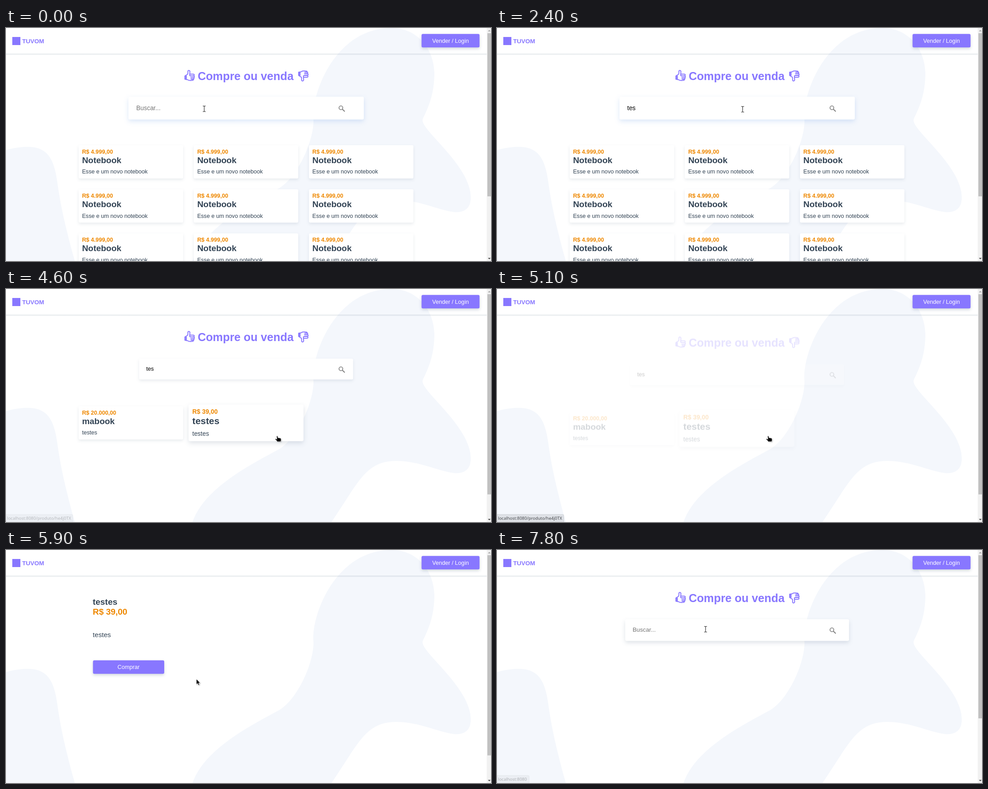
An HTML page that plays this animation: 1079x519 px, repeating every 8 s.

```html
<!DOCTYPE html>
<html lang="pt">
<head>
<meta charset="utf-8">
<title>Compre ou venda</title>
<style>
  html, body { margin: 0; width: 100%; height: 100%; overflow: hidden; background: #fff; }
  svg { display: block; width: 1079px; height: 519px; }
  text { font-family: "Liberation Sans", Arial, sans-serif; font-size: 12.64px; fill: #345; white-space: pre; }
  .bold { font-weight: bold; }
  .title { font-weight: bold; font-size: 18.96px; }
  .price { font-weight: bold; fill: #e80; }
  .white { fill: #fff; text-anchor: middle; }
  .box { fill: #fff; filter: drop-shadow(0 3.2px 3px rgba(30, 60, 90, .1)); }
  .lift { filter: drop-shadow(0 4.7px 4.7px rgba(30, 60, 90, .14)); }
  .glow { filter: drop-shadow(0 4.7px 5px rgba(50, 120, 220, .17)); }
  .btn { fill: #87f; filter: drop-shadow(0 3.2px 3px rgba(30, 60, 90, .2)); }
  .url { font-family: "Noto Sans", "Open Sans", sans-serif; font-size: 9.48px; fill: #45484c; }
</style>
</head>
<body>
<svg viewBox="0 0 1079 519" xmlns="http://www.w3.org/2000/svg">
  <defs>
    <linearGradient id="fade" x2="0" y2="1">
      <stop stop-color="#1e3c5a" stop-opacity=".13"/>
      <stop offset="1" stop-color="#1e3c5a" stop-opacity="0"/>
    </linearGradient>
    <g id="thumb" fill="none" stroke="#87f" stroke-width="2" stroke-linejoin="round" stroke-linecap="round">
      <path d="M2 13 L7.5 9.5 C8.6 7 8 4 8.3 2.2 C9 .4 12.2 .8 12.6 3 C13 5.5 12.3 7.5 12.2 9.3"/>
      <path d="M1.5 13.5 V20.5 L7 21.5 C10 24 15 23.6 19 22.8"/>
      <path d="M13.5 9.3 H20 C23 9.3 23 13.3 20 13.3 H14.5 C11.5 13.3 11.5 9.3 13.5 9.3 Z"/>
      <path d="M14.5 13.4 H20.5 C23.4 13.4 23.2 17.2 20.5 17.2 H14.5 M15 17.4 H20 C22.6 17.4 22.4 20.4 20 20.4 H15 M15.5 20.6 H19 C21 20.6 21 22.8 19 22.8"/>
      <path d="M4.2 13.5 V20.4" stroke-width="3"/>
    </g>
  </defs>

  <g fill="#f4f7fc">
    <path d="M858 0 C915 0 952 46 953 100 C953 150 938 180 927 203 C920 226 1034 305 1034 378 C1034 405 1015 414 990 409 C950 401 915 383 868 383 C800 383 785 430 724 519 H415 C440 445 540 393 609 356 C650 330 685 250 684 205 C678 150 730 0 858 0 Z"/>
    <path d="M0 272 C20 266 40 264 55 265 C90 267 105 290 112 330 C120 380 122 405 153 519 H0 Z"/>
  </g>
  <rect y="57" width="1070" height="4" fill="url(#fade)"/>
  <rect x="14" y="20" width="18" height="18" fill="#87f"/>
  <text class="bold" x="36" y="33.8" style="font-size:13.5px;fill:#87f">TUVOM</text>
  <rect class="btn" x="924.5" y="13.3" width="129" height="30" rx="3"/>
  <text class="white" x="989" y="32.6">Vender / Login</text>

  <g id="home">
    <use href="#thumb" transform="translate(396.5 93.5)"/>
    <text class="bold" x="426.4" y="115.8" style="font-size:25.28px;fill:#87f">Compre ou venda</text>
    <use href="#thumb" transform="translate(649.5 119) scale(1 -1)"/>
    <g id="field">
      <rect id="input" class="box" x="296.2" y="155.2" width="476" height="46.2" rx="3"/>
      <text id="query" x="312" y="182.3"></text>
      <path id="caret" d="M0 171.2 V185" stroke="#000" stroke-width=".9"/>
    </g>
    <g fill="none" stroke="#808080">
      <circle cx="745.1" cy="177.7" r="4.2" stroke-width="1.7"/>
      <path d="M748.2 180.8 L753.6 186" stroke-width="2.1"/>
    </g>
    <g id="all"></g>
    <g id="found"></g>
  </g>

  <g id="product">
    <text class="title" x="193" y="122.3">testes</text>
    <text class="title price" x="193" y="144.3">R$ 39,00</text>
    <text x="193" y="194.2" style="font-size:15.17px">testes</text>
    <rect class="btn" x="193.5" y="245.8" width="158.5" height="30" rx="3"/>
    <text class="white" x="272.6" y="264.7">Comprar</text>
  </g>

  <rect x="1069.5" width="9.5" height="519" fill="#f1f1f1"/>
  <rect id="bar" x="1071" y="11.5" width="8" fill="#c1c1c1"/>
  <path d="M1072.2 7.5 h6 l-3 -3.2 z" fill="#a3a3a3"/>
  <path d="M1072.2 512 h6 l-3 3.2 z" fill="#505050"/>

  <g id="status">
    <path id="panel" fill="#dee1e6" stroke="#c6c9cd" stroke-width=".8"/>
    <text id="link" class="url" x="2.2" y="514.3"></text>
  </g>

  <g id="text">
    <path d="M-3.2 -6.3 H-1 L0 -5.5 L1 -6.3 H3.2 M0 -5.5 V5.5 M-3.2 6.3 H-1 L0 5.5 L1 6.3 H3.2" fill="none" stroke="#fff" stroke-width="2.4"/>
    <path d="M-3.2 -6.3 H-1 L0 -5.5 L1 -6.3 H3.2 M0 -5.5 V5.5 M-3.2 6.3 H-1 L0 5.5 L1 6.3 H3.2" fill="none" stroke="#222" stroke-width="1.1"/>
  </g>
  <path id="arrow" d="M.5 .5 V12.6 L3.2 10 L5.2 14.2 L7.3 13.2 L5.4 9.2 H9 Z" fill="#000" stroke="#fff" stroke-width=".8" style="filter:drop-shadow(1px 1px 1px rgba(0,0,0,.3))"/>
  <path id="hand" d="M-3.3 -5.8 C-2.5 -6.8 -1.4 -6.2 -1.2 -5.2 L-.4 -2.1 L4 -1.4 C5.6 -1.1 6.4 -.2 6.4 1.4 V4 L5.4 6.5 H-2.3 L-3.3 4.2 L-6.2 1.8 C-7 .7 -5.8 -.3 -4.8 .2 L-2.6 1.3 L-3.4 -4.4 Z" fill="#000" stroke="#fff" stroke-width=".7" style="filter:drop-shadow(1px 1px 1px rgba(0,0,0,.3))"/>
</svg>
<script>
const LOOP = 8000;
const $ = id => document.getElementById(id);

function card(col, row, price, name, note) {
  const x = 161.6 + col * 256.2, y = 261 + row * 98.25;
  return `<g><rect class="box" x="${x}" y="${y}" width="232.4" height="74.2" rx="3"/>
    <text class="price" x="${x + 7.6}" y="${y + 18.8}">${price}</text>
    <text class="title" x="${x + 7.6}" y="${y + 39.6}">${name}</text>
    <text x="${x + 7.6}" y="${y + 63.3}">${note}</text></g>`;
}

let cards = '';
for (let i = 0; i < 9; i++)
  cards += card(i % 3, Math.floor(i / 3), 'R$ 4.999,00', 'Notebook', 'Esse e um novo notebook');
$('all').innerHTML = cards;
$('found').innerHTML = card(0, 0, 'R$ 20.000,00', 'mabook', 'testes') + card(1, 0, 'R$ 39,00', 'testes', 'testes');
const hovered = $('found').lastElementChild;

// Each row starts with its time in ms and holds until the next one.
const pointer = [
  [0, 'text', 441, 180], [300, 'text', 469.8, 180.5], [2400, 'text', 546.5, 181],
  [3700, 'arrow', 828, 204], [4000, 'arrow', 798, 219], [4100, 'arrow', 744, 245], [4200, 'arrow', 682, 268],
  [4400, 'hand', 605.5, 333.5], [5800, 'arrow', 612, 332], [5900, 'arrow', 423, 287],
  [6100, 'arrow', 340, 238], [6200, 'arrow', 225, 172], [6300, 'arrow', 139, 123],
  [6500, 'arrow', 92, 70], [6600, 'hand', 57.5, 30.5], [7300, 'arrow', 68, 36], [7800, 'text', 464, 176.5]
];
// time, text, caret offset (0 = hidden), scale
const search = [
  [0, '', 0, 1.1], [600, 't', 4, 1.1], [1200, 't', 0, 1.1], [1400, 'te', 11, 1.1],
  [1600, 'tes', 17.3, 1.1], [2100, 'tes', 0, 1.1], [3700, 'tes', 0, 1], [7800, '', 0, 1.046]
];
// time, page, opacity, vertical shift
const pages = [
  [0, 'home', 1, 0], [5100, 'home', .21, 12.5], [5200, '', 0, 0],
  [5400, 'product', .75, 0], [5600, 'product', 1, 0],
  [7300, 'product', .22, 12], [7800, 'home', 1, 0]
];
const lists = [[0, 'all'], [3700, 'found'], [7800, '']];
const item = 'localhost:8080/produto/he4j0TX', root = 'localhost:8080';
const status = [
  [0, '', 0], [4600, item, .35], [4700, item, .7], [4800, item, 1], [5600, '', 0],
  [6800, root, .5], [6900, root, 1], [7800, root, .4]
];

const at = (rows, t) => rows.filter(r => r[0] <= t).pop().slice(1);
const show = (id, on) => { $(id).style.display = on ? '' : 'none'; };
const set = (id, name, value) => $(id).setAttribute(name, value);
const zoom = (x, y, s) => `translate(${x} ${y}) scale(${s}) translate(${-x} ${-y})`;

function draw(t) {
  const [kind, px, py] = at(pointer, t);
  for (const id of ['text', 'arrow', 'hand']) show(id, id === kind);
  set(kind, 'transform', `translate(${px} ${py})`);

  const [page, alpha, dy] = at(pages, t);
  for (const id of ['home', 'product']) show(id, id === page);
  if (page) {
    set(page, 'opacity', alpha);
    set(page, 'transform', `translate(0 ${dy})`);
  }

  const [list] = at(lists, t);
  for (const id of ['all', 'found']) show(id, id === list);
  const over = t >= 4400 && t < 5200;
  hovered.setAttribute('transform', zoom(534, 298.1, over ? 1.1 : 1));
  hovered.firstElementChild.setAttribute('class', over ? 'box lift' : 'box');

  const [query, caret, size] = at(search, t);
  $('query').textContent = query || 'Buscar...';
  $('query').style.fill = query ? '#000' : '#757575';
  set('field', 'transform', zoom(534.2, 178.3, size));
  set('input', 'class', size > 1.05 ? 'box glow' : size > 1 ? 'box lift' : 'box');
  show('caret', caret);
  set('caret', 'transform', `translate(${312 + caret} 0)`);

  const [url, shade] = at(status, t);
  const edge = url === item ? 148.6 : 71.6;
  show('status', url);
  set('status', 'opacity', shade);
  $('link').textContent = url;
  set('panel', 'd', `M-1 502.2 H${edge - 2.5} Q${edge} 502.2 ${edge} 504.7 V520 H-1 Z`);

  set('bar', 'height', t >= 3700 && t < 7800 ? 446 : 363.5);
}

function frame() {
  draw(performance.now() % LOOP);
  requestAnimationFrame(frame);
}
frame();
</script>
</body>
</html>
```
